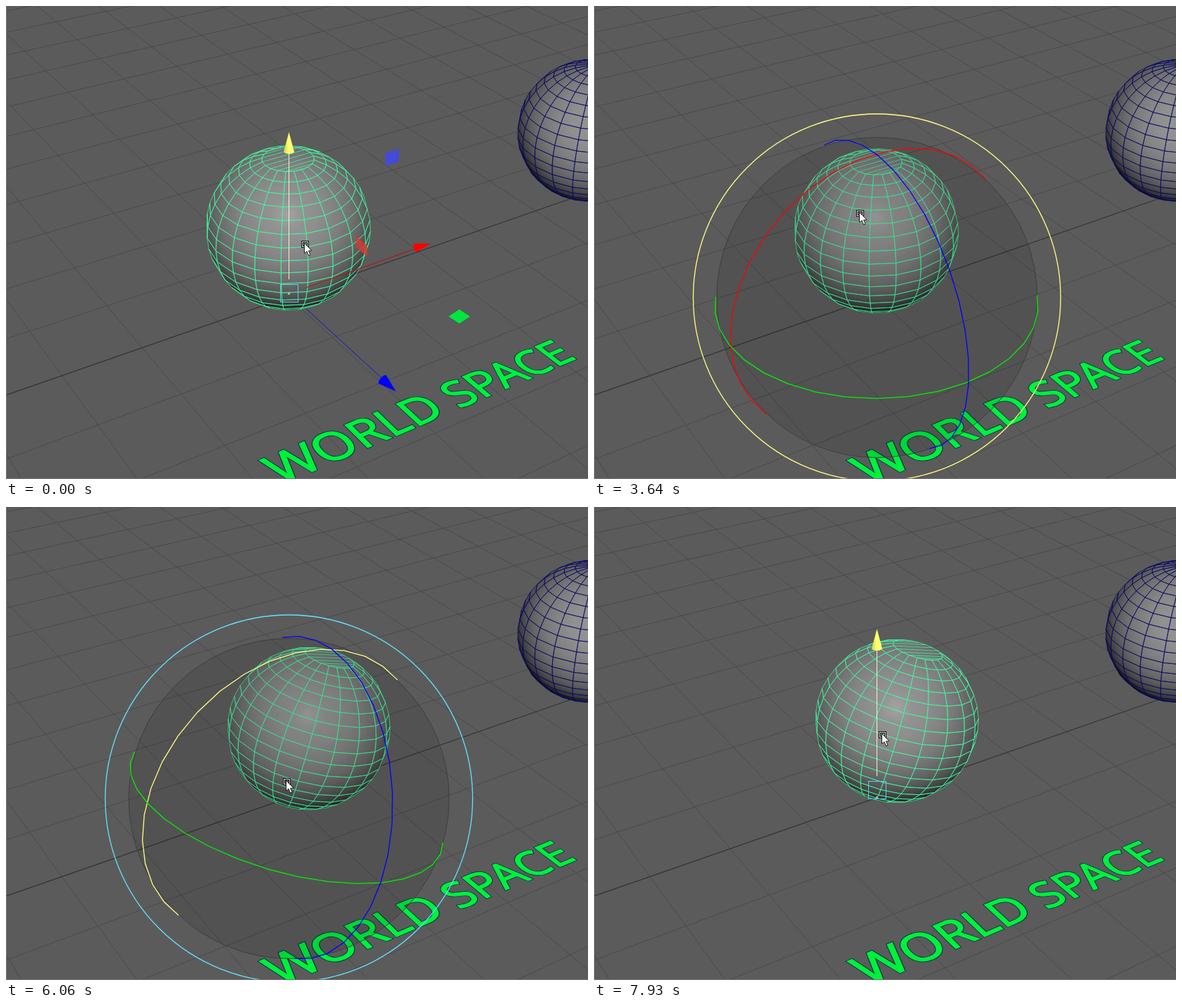
An HTML page with a canvas that plays this animation: 830x675 px, repeating every 8 s.

```html
<!DOCTYPE html>
<html lang="en">
<head>
<meta charset="utf-8">
<title>World space</title>
<style>
  html, body { margin: 0; width: 100%; height: 100%; overflow: hidden; background: #5b5b5b; }
  canvas { display: block; }
</style>
</head>
<body>
<canvas id="stage" width="830" height="675"></canvas>
<script>
const ctx = document.getElementById('stage').getContext('2d');
const LOOP = 8000, TICK = 133.85, RAD = Math.PI / 180;

// ---- timing: key poses, joined by ease-out moves ----
const TIP = [[1360, 180], [1630, 151], [2170, 203], [2530, 184],
  [7030, 184], [7270, 118], [7540, 197], [7740, 133], [7930, 174]];
const TILT = [[4700, 0], [5230, 17.8]];
const HAND = [[900, 421, 339], [1360, 401, 306], [3500, 402, 306], [4200, 315, 260], [4460, 315, 251],
  [4700, 315, 251], [5230, 358, 217], [5700, 362, 235], [6060, 395, 387], [6490, 398, 380],
  [6890, 401, 329], [7930, 406, 330]];
const MODE = [[0, 'move'], [1090, 'hover'], [1510, 'drag'], [2840, 'move'], [3370, 'rotate'],
  [3640, 'rotateDisc'], [4460, 'ringHover'], [4580, 'ringDrag'], [5940, 'ringDisc'],
  [6490, 'move'], [7030, 'drag']];

function tween(keys, t) {
  const next = keys.findIndex(k => k[0] > t);
  if (next === 0) return keys[0].slice(1);
  if (next < 0) return keys[keys.length - 1].slice(1);
  const a = keys[next - 1], b = keys[next];
  const e = Math.sin((t - a[0]) / (b[0] - a[0]) * Math.PI / 2);
  return a.slice(1).map((v, i) => v + (b[i + 1] - v) * e);
}
const modeAt = t => MODE.reduce((hit, row) => row[0] <= t ? row : hit)[1];
const sampled = t => 970 + Math.floor((t - 970) / TICK + 0.38) * TICK;

// ---- camera: one world unit is one pixel at the origin ----
const F = 1750, CX = 415, CY = 337, ORIGIN = [-12, -78, F];
const PITCH = 32 * RAD, YAW = 31.6 * RAD;
const sinP = Math.sin(PITCH), cosP = Math.cos(PITCH);
const sinA = Math.sin(YAW), cosA = Math.cos(YAW);
const AX = [cosA, sinA * sinP, sinA * cosP];
const AY = [0, cosP, -sinP];
const AZ = [sinA, -cosA * sinP, -cosA * cosP];

const dot = (a, b) => a[0] * b[0] + a[1] * b[1] + a[2] * b[2];
const cross = (a, b) => [a[1] * b[2] - a[2] * b[1], a[2] * b[0] - a[0] * b[2], a[0] * b[1] - a[1] * b[0]];
const unit = a => { const n = Math.hypot(...a); return a.map(v => v / n); };
const turn = ([x, y, z]) => [0, 1, 2].map(i => AX[i] * x + AY[i] * y + AZ[i] * z);
const toCam = p => turn(p).map((v, i) => v + ORIGIN[i]);
const toScreen = c => [CX + F * c[0] / c[2], CY - F * c[1] / c[2]];
const project = p => toScreen(toCam(p));
const tiltBy = ([x, y, z], deg) => {
  const s = Math.sin(deg * RAD), c = Math.cos(deg * RAD);
  return [x * c + y * s, y * c - x * s, z];
};

// ---- drawing helpers ----
function poly(points, close, path = new Path2D()) {
  points.forEach((p, i) => i ? path.lineTo(...p) : path.moveTo(...p));
  if (close) path.closePath();
  return path;
}
function stroke(path, color, width = 1) {
  ctx.strokeStyle = color;
  ctx.lineWidth = width;
  ctx.stroke(path);
}
function fill(path, color) {
  ctx.fillStyle = color;
  ctx.fill(path);
}
function circle(x, y, r) {
  const path = new Path2D();
  path.arc(x, y, r, 0, 2 * Math.PI);
  return path;
}
function box(x, y, w, h, color) {
  ctx.strokeStyle = color;
  ctx.lineWidth = 1;
  ctx.strokeRect(x + 0.5, y + 0.5, w, h);
}

// ---- ground ----
const CELL = 115;
function grid() {
  const lo = -12 * CELL, hi = 12 * CELL, near = 6 * CELL;
  const path = new Path2D();
  const line = (a, b, to) => poly([project(a), project(b)], false, to);
  for (let v = lo; v <= hi; v += CELL) {
    if (v && v <= near) line([-near, 0, v], [hi, 0, v], path);
    if (v >= -near) line([v, 0, lo], [v, 0, near], path);
  }
  stroke(path, '#494949', 0.9);
  stroke(line([-near, 0, 0], [hi, 0, 0]), '#363636', 1.2);
}

function groundText(text, x0, z0, size) {
  ctx.save();
  ctx.font = size + 'px "Open Sans", "Noto Sans", sans-serif';
  ctx.lineJoin = 'miter';
  ctx.miterLimit = 3;
  const width = s => ctx.measureText(s).width;
  const lift = size * 0.36;
  [...text].forEach((ch, i) => {
    const w = width(ch);
    const mx = x0 + width(text.slice(0, i + 1)) - w / 2, mz = z0 - lift;
    const o = project([mx, 0, mz]);
    const ex = project([mx + 1, 0, mz]), ez = project([mx, 0, mz + 1]);
    ctx.setTransform(ex[0] - o[0], ex[1] - o[1], ez[0] - o[0], ez[1] - o[1], o[0], o[1]);
    // dark rim first, then the thickened letter
    [['#06284a', 3.8], ['#00f03c', 2]].forEach(([color, line]) => {
      ctx.strokeStyle = color;
      ctx.lineWidth = line;
      ctx.strokeText(ch, -w / 2, lift);
    });
    ctx.fillStyle = '#00f03c';
    ctx.fillText(ch, -w / 2, lift);
  });
  ctx.restore();
}

// ---- spheres ----
const SIDES = 20, STEP = 360 / SIDES, BAND = 9, RADIUS = 113;

function shading(x, y, r, gleam) {
  const g = ctx.createRadialGradient(x, y, 0, x, y, r);
  for (let u = 0; u <= 1; u += 0.05) {
    const level = 8 + 140 * Math.sqrt(1 - u * u) + gleam * Math.max(0, 1 - u * 6);
    g.addColorStop(u, `rgb(${level},${level},${level})`);
  }
  g.addColorStop(1, '#080808');
  return g;
}

function ball({ center, tilt = 0, cap, wire, light, gleam }) {
  const mid = toCam(center);
  const vertex = (lat, i) => {
    const a = lat * RAD, b = i * STEP * RAD;
    const n = [Math.sin(a) * Math.cos(b), Math.cos(a), Math.sin(a) * Math.sin(b)];
    return turn(tiltBy(n, tilt)).map((v, k) => v * RADIUS + mid[k]);
  };
  const faces = new Path2D();
  for (let lat = cap; lat < 180; lat += BAND) {
    for (let i = 0; i < SIDES; i++) {
      const quad = [vertex(lat, i), vertex(lat, i + 1), vertex(lat + BAND, i + 1), vertex(lat + BAND, i)];
      const c = [0, 1, 2].map(k => quad.reduce((s, p) => s + p[k], 0) / 4);
      if (dot(c.map((v, k) => v - mid[k]), c) < 0) poly(quad.map(toScreen), true, faces);
    }
  }
  if (cap) {
    const rim = Array.from({ length: SIDES }, (_, i) => toScreen(vertex(cap, i)));
    poly(rim, true, faces);
    for (let i = -4; i <= 4; i++) poly([rim[(i + SIDES) % SIDES], rim[10 - i]], false, faces);
  }
  const [x, y] = toScreen(mid), [lx, ly, lr] = light;
  fill(faces, shading(x + lx, y + ly, lr, gleam));
  stroke(faces, wire, 0.75);
}

// ---- move handle ----
const YELLOW = '#ffff70', ORANGE = '#e8b070', CYAN = '#58d0e8';

function arrow(tip, base, half, color) {
  const dir = Math.atan2(tip[1] - base[1], tip[0] - base[0]);
  const path = new Path2D();
  path.ellipse(...base, half * 0.4, half, dir, Math.PI / 2, Math.PI * 1.5);
  path.lineTo(...tip);
  path.closePath();
  fill(path, color);
}
function plane([x, y], [ux, uy], [vx, vy], color) {
  const corner = (a, b) => [x + a * ux + b * vx, y + a * uy + b * vy];
  fill(poly([corner(-1, -1), corner(1, -1), corner(1, 1), corner(-1, 1)], true), color);
}

function yHandle(color) {
  stroke(poly([[0.5, -200], [0.5, -20]]), color === ORANGE ? ORANGE : '#f2f2d2');
  const g = ctx.createLinearGradient(-7, 0, 0, 0);
  g.addColorStop(0, '#d0d04c');
  g.addColorStop(1, color);
  arrow([0.5, -230], [0.5, -202], 7.5, g);
  box(-12, -13, 25, 25, CYAN);
}
function sideHandles() {
  plane([147.5, -194], [9.5, -3], [0, 9], '#434adc');
  plane([243.5, 33], [7.7, -5], [7.7, 5], '#00e640');
  plane([104, -67], [8, 7], [0, 8], 'rgba(212,60,50,.85)');
  stroke(poly([[25, -8], [182, -64]]), '#c40808');
  arrow([203, -71], [181, -65], 6, '#ff0000');
  stroke(poly([[25, 22], [136, 124]]), '#1414c8');
  arrow([153, 140], [134, 123], 8, '#0000ff');
}

// ---- rotate handle ----
const RING = 229;
function ring(normal, tilt, pivot, color) {
  const n = turn(tiltBy(normal, tilt)), c = toCam(pivot);
  const u = unit(cross(n, c));
  let w = cross(n, u);
  if (dot(w, c) > 0) w = w.map(v => -v);
  const pts = [];
  for (let a = 0; a <= 180; a += 10) {
    const p = Math.cos(a * RAD) * RING, q = Math.sin(a * RAD) * RING;
    pts.push(toScreen(c.map((v, i) => v + u[i] * p + w[i] * q)));
  }
  stroke(poly(pts), color, 1.3);
}

function rotateHandle(mode, tilt, pivot) {
  const disc = circle(403.5, 416, 228.5);
  if (mode.endsWith('Disc')) fill(disc, 'rgba(0,0,0,.1)');
  stroke(disc, '#3e3e3e');
  const used = mode === 'ringDrag' || mode === 'ringDisc';
  ring([0, 0, 1], 0, pivot, used ? '#ffff80' : mode === 'ringHover' ? ORANGE : '#ff0000');
  ring([0, 1, 0], tilt, pivot, '#00f000');
  ring([1, 0, 0], tilt, pivot, '#0000ff');
  stroke(circle(403.5, 416, 262), used ? '#66e0ff' : '#ffff80', 1.3);
}

// ---- pointer ----
function pointer(x, y) {
  ctx.save();
  ctx.translate(Math.round(x), Math.round(y));
  ['#101010', '#d8d8d8', '#101010'].forEach((c, i) => box(i, i, 10 - 2 * i, 9 - 2 * i, c));
  const shape = poly([[4.5, 3.5], [4.5, 18], [8, 15], [10.5, 21], [13, 20], [10.5, 14.3], [15, 14]], true);
  fill(shape, '#ffffff');
  stroke(shape, '#202020');
  ctx.restore();
}

// ---- scene ----
function draw(now) {
  const mode = modeAt(now), t = sampled(now);
  const [tip] = tween(TIP, t), [tilt] = tween(TILT, t), [x, y] = tween(HAND, t);
  const pivotY = Math.round(tip) + 230;
  const pivot = [0, (415 - pivotY) / 0.824, 0];
  const offset = tiltBy([0, 109, 0], tilt);

  ctx.fillStyle = '#5b5b5b';
  ctx.fillRect(0, 0, 830, 675);
  grid();
  groundText('WORLD SPACE', -208, 324, 68.5);
  ball({ center: [573, 105.5, -17], cap: BAND, wire: '#0a0a64', light: [6, -10, 113], gleam: 0 });
  ball({
    center: offset.map((v, i) => v + pivot[i]), tilt, cap: 2 * BAND,
    wire: '#43f5a0', light: [-1, -19, 137], gleam: 14
  });

  if (/^r/.test(mode)) {
    rotateHandle(mode, tilt, pivot);
  } else {
    ctx.save();
    ctx.translate(403, pivotY);
    if (mode !== 'drag') sideHandles();
    yHandle(mode === 'hover' ? ORANGE : YELLOW);
    ctx.restore();
    ctx.fillStyle = '#b0b0b0';
    ctx.fillRect(402, tilt ? 413 : 409, 3, 3);
  }

  // the hand rides along with the dragged handle
  pointer(x, y + tip - 184);
  ctx.fillStyle = '#757575';
  ctx.fillRect(0, 0, 1, 675);
  ctx.fillRect(0, 674, 830, 1);
}

const start = performance.now();
function tick() {
  draw((performance.now() - start) % LOOP);
  requestAnimationFrame(tick);
}
tick();
</script>
</body>
</html>
```
